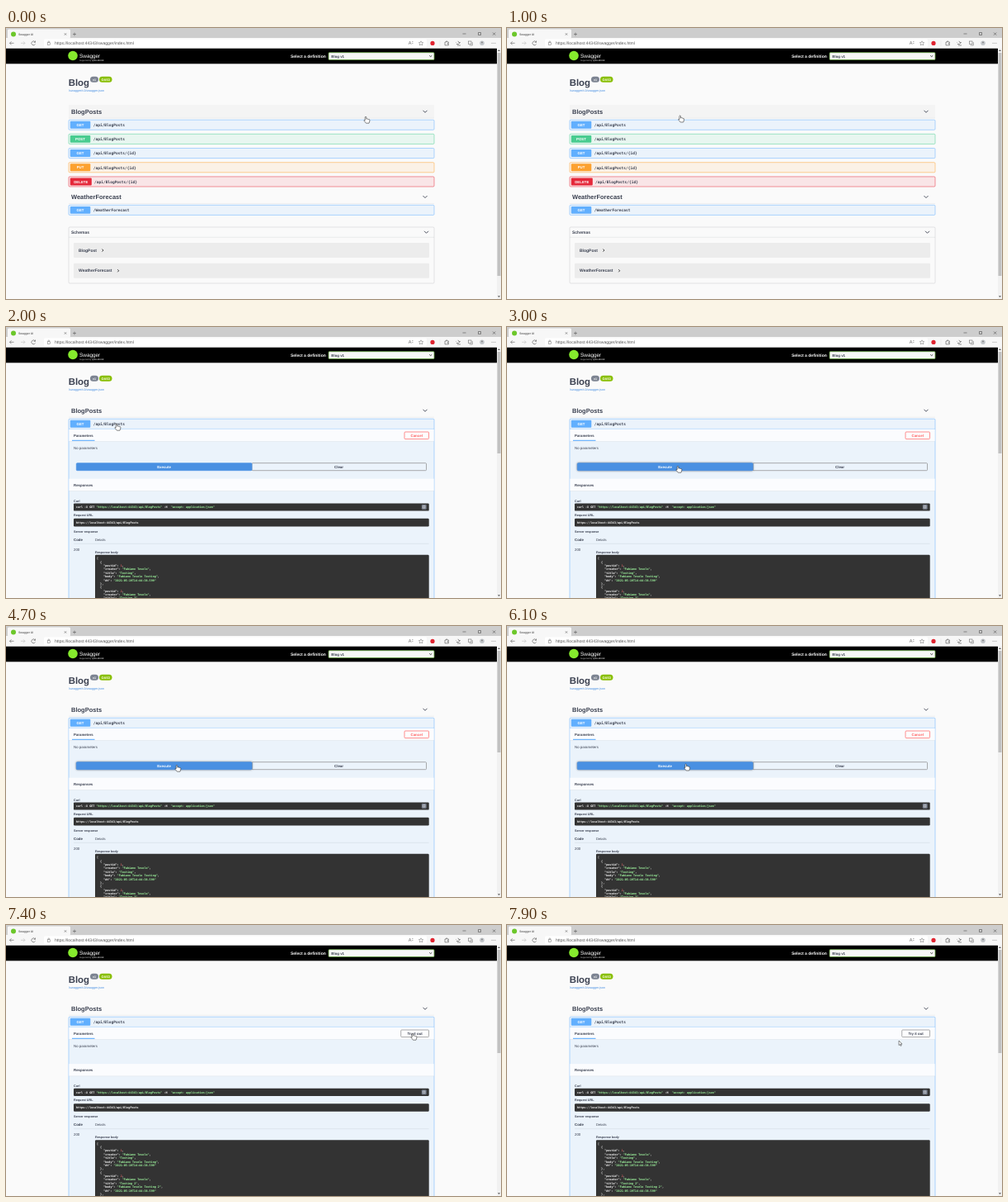
Animation, 600 px wide and 328 px high, one loop 8 s. Source, as an HTML page:

```html
<!DOCTYPE html>
<html lang="en">
<head>
<meta charset="utf-8">
<title>Swagger UI</title>
<style>
  html, body { margin: 0; width: 100%; height: 100%; overflow: hidden; background: #fafafa; }
  svg { display: block; width: 100%; height: 100%; }
  text { font-family: "Liberation Sans", Arial, sans-serif; white-space: pre; text-rendering: geometricPrecision; }
  .b { font-weight: 700; }
  .mid { text-anchor: middle; }
  .mono { font-family: "DejaVu Sans Mono", monospace; font-weight: 700; }
  .glow { filter: drop-shadow(0 0 1px rgba(0, 0, 0, .5)); }
</style>
</head>
<body>
<svg id="stage" viewBox="0 0 600 328" preserveAspectRatio="none"></svg>
<script>
const INK = '#3b4151', BLUE = '#61affe', GREEN = '#49cc90', ORANGE = '#fca130', RED = '#e5283a';
const STRING = '#a2fca2', NUMBER = '#d36363';
const LOOP = 8000, OPEN = 2000, CANCEL = 7400;

// Markup helpers
const rect = (x, y, w, h, fill, more = '') =>
  `<rect x="${x}" y="${y}" width="${w}" height="${h}" fill="${fill}" ${more}/>`;
const text = (x, y, size, str, fill = INK, cls = '') =>
  `<text x="${x}" y="${y}" font-size="${size}" fill="${fill}" class="${cls}">${str}</text>`;
const bold = (x, y, size, str, fill) => text(x, y, size, str, fill, 'b');
const centered = (x, y, size, str, fill) => text(x, y, size, str, fill, 'b mid');
const circle = (x, y, r, fill, more = '') => `<circle cx="${x}" cy="${y}" r="${r}" fill="${fill}" ${more}/>`;
const line = (d, color = INK, width = .6, more = '') =>
  `<path d="${d}" fill="none" stroke="${color}" stroke-width="${width}" ${more}/>`;
const group = (id, content, more = '') => `<g id="${id}" ${more}>${content}</g>`;
const chevron = (x, y) => line(`M${x - 2.5} ${y - 1.2}l2.5 2.5 2.5-2.5`, INK, .9);
const tint = (text, color) => `<tspan fill="${color}">${text}</tspan>`;

function browser() {
  const grey = '#666';
  return rect(0, 0, 600, 12, '#cdcdcd') + rect(2, 1.5, 76, 11, '#f7f7f7', 'rx="1.5"') +
    rect(0, 12, 600, 12.5, '#f7f7f7') + rect(46, 13.5, 464, 9.5, '#fff', 'rx="1.5"') +
    circle(9, 7.5, 3, '#6cc72b') + text(15, 9, 3.5, 'Swagger UI', '#333') +
    line('M70.8 6.3l2.4 2.4m0-2.4l-2.4 2.4M81 7.5h4m-2-2v4', '#444', .5) +
    line('M553.5 7h4M572.5 5.5h3v3h-3zM590 5.5l3.2 3.2m0-3.2l-3.2 3.2', '#333', .5) +
    line('M9.5 18.3h-5m2-2l-2 2 2 2', '#555', .6) +
    line('M18 18.3h5m-2-2l2 2-2 2', '#bbb', .6) +
    line('M35.3 17a2.4 2.4 0 1 0 .2 2.4M35.5 15.5v1.8h-1.8', '#555', .6) +
    rect(50.2, 17.8, 3.4, 2.8, 'none', `stroke="${grey}" stroke-width=".5"`) +
    line('M51 17.8v-1a.9.9 0 0 1 1.8 0v1', grey, .5) +
    text(59, 20.3, 5.08, 'https://localhost:44343/swagger/index.html', '#555') +
    line('M488 20l1.6-4 1.6 4m-2.6-1.4h2M492 16.5h1.5m-1.5 2h1.5', grey, .5) +
    line('M503 15.8l.8 1.7 1.9.2-1.4 1.3.4 1.9-1.7-1-1.7 1 .4-1.9-1.4-1.3 1.9-.2z', grey, .5) +
    circle(517, 18.4, 2.6, '#e02430') +
    line('M532 17h1.5v-1h1.4v1h1.5v1.5h-1v1h1v1.4H532z', '#555', .6) + line('M526 15v7', '#ddd', .4) +
    line('M548 15.8l.7 1.6 1.8.2-1.4 1.2M546 17.5h-.5m.4 2h3m-2 1.5h4', '#444', .6) +
    rect(560.3, 16, 3.7, 3.7, 'none', 'stroke="#555" stroke-width=".5"') + line('M561.6 21h3.7v-3.8', '#555', .5) +
    circle(577, 18.3, 2.8, '#c4c8cc') + circle(577, 17.6, 1, '#888') +
    circle(589, 18.3, .45, '#444') + circle(591, 18.3, .45, '#444') + circle(593, 18.3, .45, '#444');
}

function pageTop() {
  return rect(0, 24.5, 595, 18.8, '#000') + circle(81, 33.5, 5.8, '#85ea2d') +
    text(89, 35.8, 6.4, 'Swagger', '#fff') + text(89, 39.6, 2.4, 'Supported by <tspan class="b">QUILLMOOR</tspan>', '#ccc') +
    bold(345, 36, 5, 'Select a definition', '#fff') +
    rect(391, 29.7, 128, 8.8, '#f7f7f7', 'stroke="#62a03f" stroke-width=".8" rx="1"') +
    bold(394.3, 35.7, 4.375, 'Blog v1') + line('M513.2 33.3l1.5 1.4 1.5-1.4', '#222', .8) +
    bold(75.7, 70, 11.4, 'Blog') +
    rect(102, 58.7, 10, 7, '#7d8492', 'rx="3.5"') + centered(107, 63.6, 3.6, 'v1', '#fff') +
    rect(113, 58.7, 15.5, 7, '#89bf04', 'rx="3.5"') + centered(120.7, 63.7, 3.9, 'OAS3', '#fff') +
    text(76, 76.6, 3.75, '/swagger/v1/swagger.json', '#4990e2') +
    rect(76, 93, 443, 16, 'rgba(0,0,0,.025)', 'id="tagHover"') + section(101, 'BlogPosts');
}

function section(y, name) {
  return bold(79, y + 2.7, 7.5, name) + chevron(508, y) +
    line(`M76 ${y + 8.2}h443`, 'rgba(59,65,81,.15)', .4);
}

function summary(y, method, path, color) {
  const wide = method === 'DELETE';
  return rect(77.8, y + 1.6, wide ? 26 : 24.5, 8.9, color, 'rx="1"') +
    centered(wide ? 90.8 : 90, y + 7.6, 4.375, method, '#fff') +
    text(wide ? 107 : 105.7, y + 7.8, 4.56, path, INK, 'mono');
}

const frame = (y, h, color) =>
  rect(76, y, 443, h, color, `fill-opacity=".1" stroke="${color}" stroke-width=".5" rx="1.2"`);
const operation = (y, ...args) => frame(y, 12.1, args[2]) + summary(y, ...args);

function listView() {
  const model = (y, name, arrowX) => rect(82, y, 431, 18, 'rgba(0,0,0,.055)', 'rx="1"') +
    bold(88, y + 10.6, 5, name) + line(`M${arrowX} ${y + 7.6}l1.4 1.5-1.4 1.5`, '#111', .8);
  return operation(111.2, 'GET', '/api/BlogPosts', BLUE) +
    operation(128.3, 'POST', '/api/BlogPosts', GREEN) +
    operation(145.5, 'GET', '/api/BlogPosts/{id}', BLUE) +
    operation(162.7, 'PUT', '/api/BlogPosts/{id}', ORANGE) +
    operation(179.9, 'DELETE', '/api/BlogPosts/{id}', RED) +
    section(204.3, 'WeatherForecast') + operation(214.3, 'GET', '/WeatherForecast', BLUE) +
    rect(76, 241, 443, 68, 'none', 'stroke="rgba(59,65,81,.3)" stroke-width=".4" rx="1.2"') +
    bold(79, 249, 5, 'Schemas') + chevron(509.5, 247) + line('M76 253.3h443', 'rgba(59,65,81,.2)', .4) +
    model(260, 'BlogPost', 116.5) + model(284.7, 'WeatherForecast', 135.3);
}

const strip = y => rect(76.3, y, 442.4, 14.6, 'rgba(255,255,255,.8)') +
  line(`M76.3 ${y + 14.8}h442.4`, 'rgba(0,0,0,.1)', .4);
const outlined = (x, y, w, h, color, fill = 'none') =>
  rect(x, y, w, h, fill, `stroke="${color}" stroke-width=".7" rx="1"`);

function openView() {
  return frame(111.2, 230, BLUE) + summary(111.2, 'GET', '/api/BlogPosts', BLUE) +
    line('M76 123.4h443', BLUE, .4) + strip(123.7) +
    bold(82, 132.8, 4.375, 'Parameters') + rect(80, 136.8, 27.5, 1.1, BLUE) +
    text(82, 148, 4.375, 'No parameters') +
    group('editing',
      group('cancel', outlined(483, 127, 29.5, 8.6, '#ff6060', '#fdfdfe') + centered(497.7, 132.8, 4.375, 'Cancel', '#ff6060')) +
      outlined(298, 164.7, 211.5, 9, '#888') + centered(403.5, 170.8, 4.375, 'Clear') +
      group('execute', outlined(85.3, 164.7, 212.7, 9, '#4990e2', '#4990e2') + centered(191.5, 170.8, 4.375, 'Execute', '#fff'))) +
    group('tryOut', outlined(478.7, 127, 33.8, 8.6, '#888', '#fdfdfe') + centered(495.6, 132.8, 4.375, 'Try it out')) +
    group('responses', responses());
}

function responses() {
  const url = 'https://localhost:44343/api/BlogPosts';
  const code = (x, y, str, color = '#fff') => text(x, y, 3.42, str, color, 'mono');
  const dark = (x, y, w, h) => rect(x, y, w, h, '#333', 'rx="1.2"');
  const field = (key, value, color = STRING) => `    "${key}": ${tint(value, color)}`;
  const post = (id, suffix, end) => [
    '  {',
    field('postid', id, NUMBER) + ',',
    field('creator', '"Fabiano Tovelo"') + ',',
    field('title', `"Testing${suffix}"`) + ',',
    field('body', `"Fabiano Tovelo Testing${suffix}"`) + ',',
    field('dt', '"2021-05-19T14:44:38.599"'),
    '  }' + end
  ];
  const body = ['[', ...post(1, '', ','), ...post(2, ' 2', ','), ...post(3, ' 3', '')];
  return strip(183.7) + bold(82, 192.8, 4.375, 'Responses') +
    bold(82, 211.7, 3.75, 'Curl') + dark(82, 213.4, 430.7, 9.2) +
    code(84.8, 219.2, `curl -X GET ${tint(`"${url}"`, STRING)} -H  ${tint('"accept: application/json"', STRING)}`) +
    rect(503.8, 215, 5.8, 5.8, '#7d8492', 'rx="1"') + outlined(505.5, 216.5, 2.3, 2.6, '#ddd') +
    bold(82, 228.6, 3.75, 'Request URL') + dark(82, 231.8, 430.7, 9.6) + code(84.8, 238, url) +
    bold(82, 248.8, 3.75, 'Server response') +
    bold(82, 258.8, 4.375, 'Code') + text(108, 258.6, 4.1, 'Details') +
    line('M82 262.3h430.5', 'rgba(59,65,81,.2)', .4) +
    text(82, 270.8, 4.375, '200') + bold(108, 274, 3.75, 'Response body') + dark(108, 275.8, 404.7, 90) +
    body.map((row, i) => code(110, 281.2 + i * 4.39, row)).join('');
}

const scrollbar = rect(595, 24.5, 5, 304, '#f1f1f1') + rect(595.5, 30, 4, 100, '#c1c1c1', 'id="thumb"') +
  '<path d="M596 28l1.5-1.7 1.5 1.7zM596 324.3l1.5 1.7 1.5-1.7z" fill="#555"/>';

const pointer = group('hand', `<path d="M-.8 .8Q0-.5.8.8V3.2Q1.6 2.5 2.3 3.3 3 2.8 3.6 3.6 4.6 3.2 4.8 4.3V6L4 8.2H.4L-2 5.2Q-2.2 4-.8 4.8Z"
    fill="#fff" stroke="#222" stroke-width=".55" stroke-linejoin="round"/>`) +
  group('arrow', `<path d="M0 0V5.6L1.3 4.4 2.2 6.4 3.1 6 2.2 4.1H4Z" fill="#fff" stroke="#222" stroke-width=".5"/>`);

document.getElementById('stage').innerHTML = rect(0, 0, 600, 328, '#fafafa') + pageTop() +
  group('list', listView()) + group('open', openView()) + scrollbar + browser() + group('cursor', pointer);

const el = id => document.getElementById(id);
const show = (id, on) => el(id).style.display = on ? '' : 'none';

// Pointer stops: time, x, y
const PATH = [
  [200, 436, 107], [600, 380, 104], [1100, 190, 106], [1400, 134, 124], [1600, 131, 118], [1800, 131, 118],
  [1900, 132, 117], [2000, 134, 117], [2200, 142, 126], [2700, 201, 163], [2900, 207, 168], [6000, 207, 168],
  [6900, 493, 131], [7400, 493, 131], [7900, 475, 140]
];

function pointerAt(t) {
  const next = PATH.findIndex(stop => stop[0] >= t);
  if (next <= 0) return PATH[0].slice(1);
  const [t0, x0, y0] = PATH[next - 1], [t1, x1, y1] = PATH[next];
  const k = (t - t0) / (t1 - t0), ease = k * k * (3 - 2 * k);
  return [x0 + (x1 - x0) * ease, y0 + (y1 - y0) * ease];
}

function render(t) {
  const [x, y] = pointerAt(t);
  const opened = t >= OPEN, editing = t < CANCEL;
  const inside = (left, top, right, bottom) => x >= left && x <= right && y >= top && y <= bottom;
  const onExecute = opened && editing && inside(85, 164, 298, 174);
  const onClear = opened && editing && inside(298, 164, 510, 174);
  const onCancel = opened && inside(editing ? 483 : 478, 127, 513, 136);

  show('list', !opened);
  show('open', opened);
  show('editing', editing);
  show('tryOut', !editing);
  show('tagHover', inside(76, 93, 519, 109));
  el('responses').setAttribute('transform', `translate(0 ${editing ? 0 : -15.6})`);
  el('thumb').setAttribute('height', !opened ? 270 : editing ? 123 : 125);
  el('execute').classList.toggle('glow', onExecute);
  el('cancel').classList.toggle('glow', onCancel);

  const clickable = !opened || y < 123.4 || onExecute || onClear || onCancel;
  show('hand', clickable);
  show('arrow', !clickable);
  el('cursor').setAttribute('transform', `translate(${x} ${y})`);
}

function tick() {
  render(Math.floor(performance.now() % LOOP / 100) * 100);
  requestAnimationFrame(tick);
}
tick();
</script>
</body>
</html>
```
